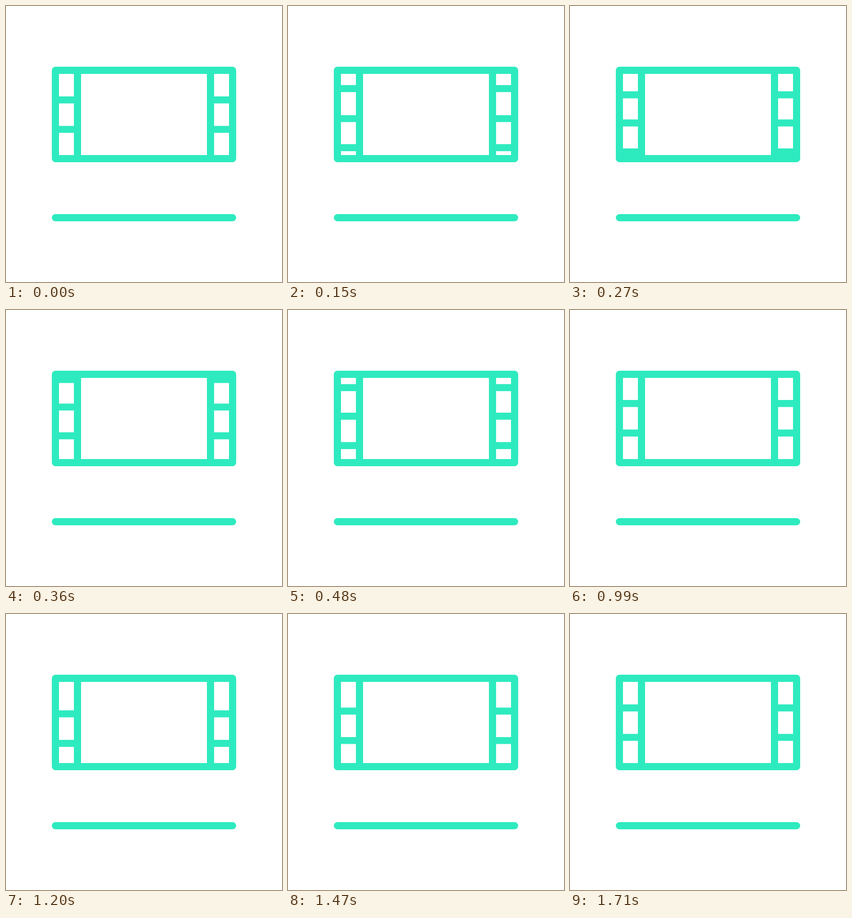
An HTML page for the animation above (1.88 s loop, 500 px wide and 500 px high).

```html
<!DOCTYPE html>
<html lang="en">
<head>
<meta charset="utf-8">
<title>Film strip</title>
<style>
  html, body { margin: 0; width: 100%; height: 100%; overflow: hidden; background: #fff; }
  svg { display: block; width: 100vw; height: 100vh; }
</style>
</head>
<body>
<svg viewBox="0 0 500 500" fill="none" stroke="#2eebbf" stroke-width="13">
  <clipPath id="window"><rect x="90" y="117" width="320" height="160"/></clipPath>
  <g id="bars" stroke-width="12.7" clip-path="url(#window)"></g>
  <rect x="89.5" y="116.5" width="321" height="160" stroke-linejoin="round"/>
  <path d="M129.5 117V276M370.5 117V276"/>
  <path d="M89.5 383.5H410.5" stroke-linecap="round"/>
</svg>
<script>
const LOOP = 1880, STEP = 30, END = 1710, PEAK = 760;

// Upward travel of the strip: time, distance, speed
const knots = [
  [0, 0, 0], [150, 20.5, 0.27], [360, 102.5, 0.35], [480, 138, 0.24],
  [PEAK, 174, 0], [1200, 149.4, 0], [END, 160.2, 0.012]
];

// Share of the travel for each bar; the first three leave for good
const shares = [1, 0.951, 0.987, 1, 1];
const LEAVING = 3;

const group = document.getElementById('bars');
const bars = shares.map(() => {
  const bar = document.createElementNS('http://www.w3.org/2000/svg', 'path');
  bar.setAttribute('d', 'M90 0H130M370 0H410');
  return group.appendChild(bar);
});

function travel(t) {
  const i = Math.max(1, knots.findIndex(k => k[0] >= t));
  const [t0, a, va] = knots[i - 1], [t1, b, vb] = knots[i];
  const h = t1 - t0, u = (t - t0) / h, w = 1 - u;
  return a * w * w * (1 + 2 * u) + b * u * u * (3 - 2 * u)
    + h * u * w * (va * w - vb * u);
}

function draw() {
  const now = performance.now() % LOOP;
  const t = Math.min(END, Math.floor(now / STEP) * STEP);
  bars.forEach((bar, i) => {
    const time = i < LEAVING ? Math.min(t, PEAK) : t;
    const y = 170.1 + 53.4 * i - shares[i] * travel(time);
    bar.setAttribute('transform', `translate(0 ${y.toFixed(2)})`);
  });
  requestAnimationFrame(draw);
}
draw();
</script>
</body>
</html>
```
